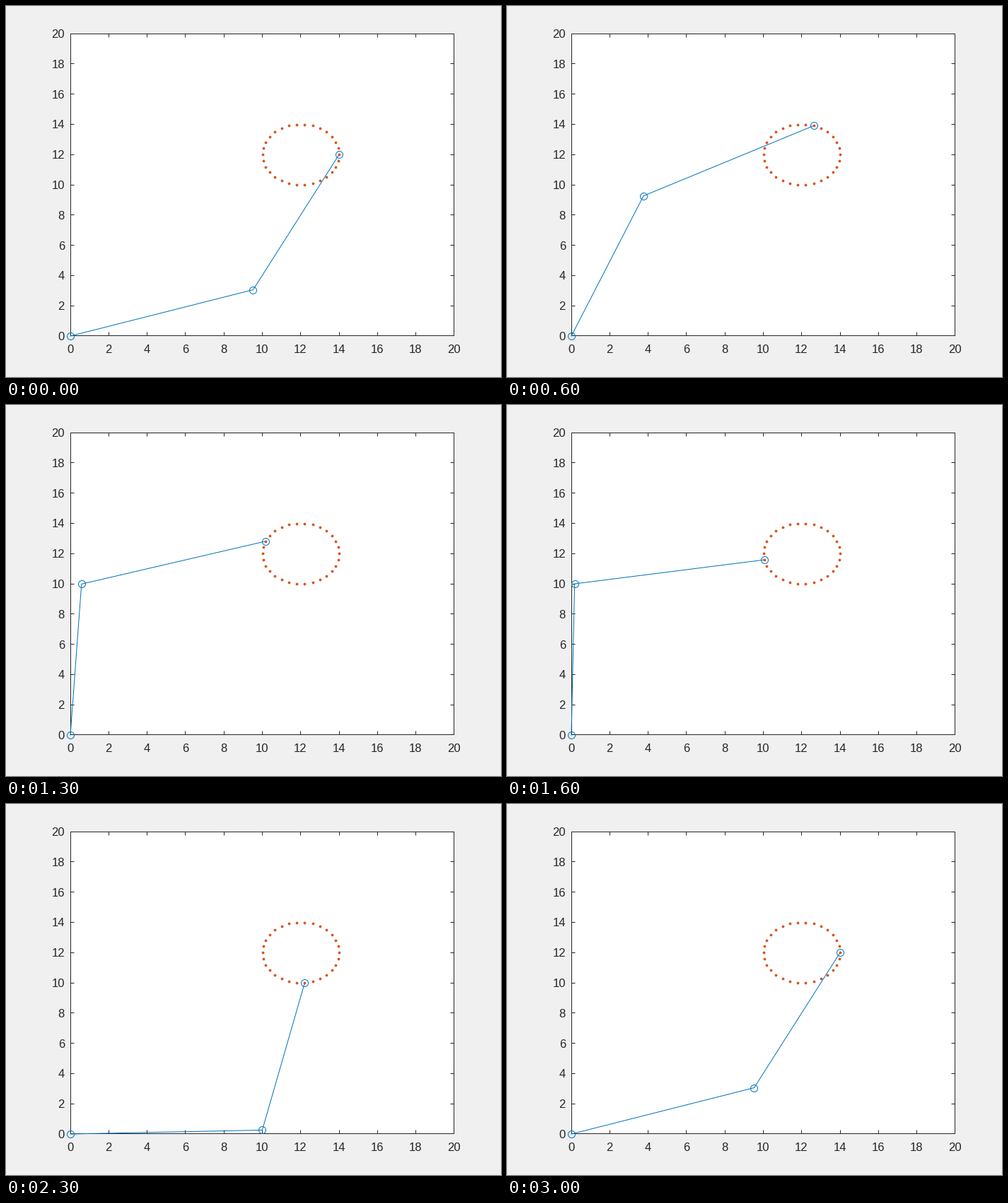
Recreate the animation shown at these times as a matplotlib script. Size 700 px wide and 525 px high, loop 3100 ms.

```python
import numpy as np
import matplotlib.pyplot as plt
from matplotlib.animation import FuncAnimation

W, H, DPI = 700, 525, 100
PX = 72 / DPI  # one pixel in points
LEFT, RIGHT, TOP, BOTTOM = 91, 634, 39, 467  # pixel box of the data range
BLUE, ORANGE, INK = "#0072BD", "#D95319", "#262626"

SPAN = 20
DX, DY = SPAN / (RIGHT - LEFT), SPAN / (BOTTOM - TOP)  # data units per pixel
STEPS = 30
LINK = 10.0
CENTER, RADIUS = 12.0, 2.0


def circle_point(angle):
    return CENTER + RADIUS * np.cos(angle), CENTER + RADIUS * np.sin(angle)


def arm_pose(step):
    """Base, elbow and tip of the two-link arm."""
    x, y = circle_point(2 * np.pi * step / STEPS)
    bend = np.arccos(np.hypot(x, y) / (2 * LINK))
    # the elbow flips when the tip crosses the diagonal
    side = 1 if y > x else -1
    shoulder = np.arctan2(y, x) + side * bend
    return [0, LINK * np.cos(shoulder), x], [0, LINK * np.sin(shoulder), y]


def label(text, x, y, align):
    fig.text(x / W, 1 - y / H, text, ha=align, va="baseline",
             family="Liberation Sans", size=16.67 * PX, color=INK)


fig = plt.figure(figsize=(W / DPI, H / DPI), dpi=DPI, facecolor="#F0F0F0")
# the frame lies on the outermost pixels inside the box
ax = fig.add_axes([LEFT / W, 1 - (BOTTOM - 1) / H,
                   (RIGHT - 1 - LEFT) / W, (BOTTOM - 1 - TOP) / H])
ax.set(xlim=(0, SPAN - DX), ylim=(DY, SPAN))
ticks = np.arange(0, SPAN + 1, 2)
# half a pixel back, so that ticks round down to whole pixels
inner = ticks[1:-1]
ax.set_xticks(inner - DX / 2)
ax.set_yticks(inner + DY / 2)
ax.tick_params(direction="in", length=5.4 * PX, width=PX, color=INK,
               top=True, right=True, labelbottom=False, labelleft=False)
for spine in ax.spines.values():
    spine.set(color=INK, linewidth=PX)

for t in ticks:
    label(str(t), LEFT - 0.3 + t / DX, 491, "center")
    label(str(t), 82.9, BOTTOM + 6 - t / DY, "right")

arm, = ax.plot([], [], "-o", color=BLUE, linewidth=PX, markersize=10 * PX,
               markerfacecolor="none", markeredgewidth=PX,
               clip_on=False, zorder=3)
dots = circle_point(2 * np.pi * np.arange(STEPS) / STEPS)
ax.plot(*dots, "o", color=ORANGE, markersize=3.8 * PX,
        markeredgewidth=0, zorder=4, scalex=False, scaley=False)


def update(step):
    arm.set_data(*arm_pose(step))
    return arm,


anim = FuncAnimation(fig, update, frames=STEPS + 1, interval=100,
                     repeat=True, repeat_delay=0)
plt.show()
```
